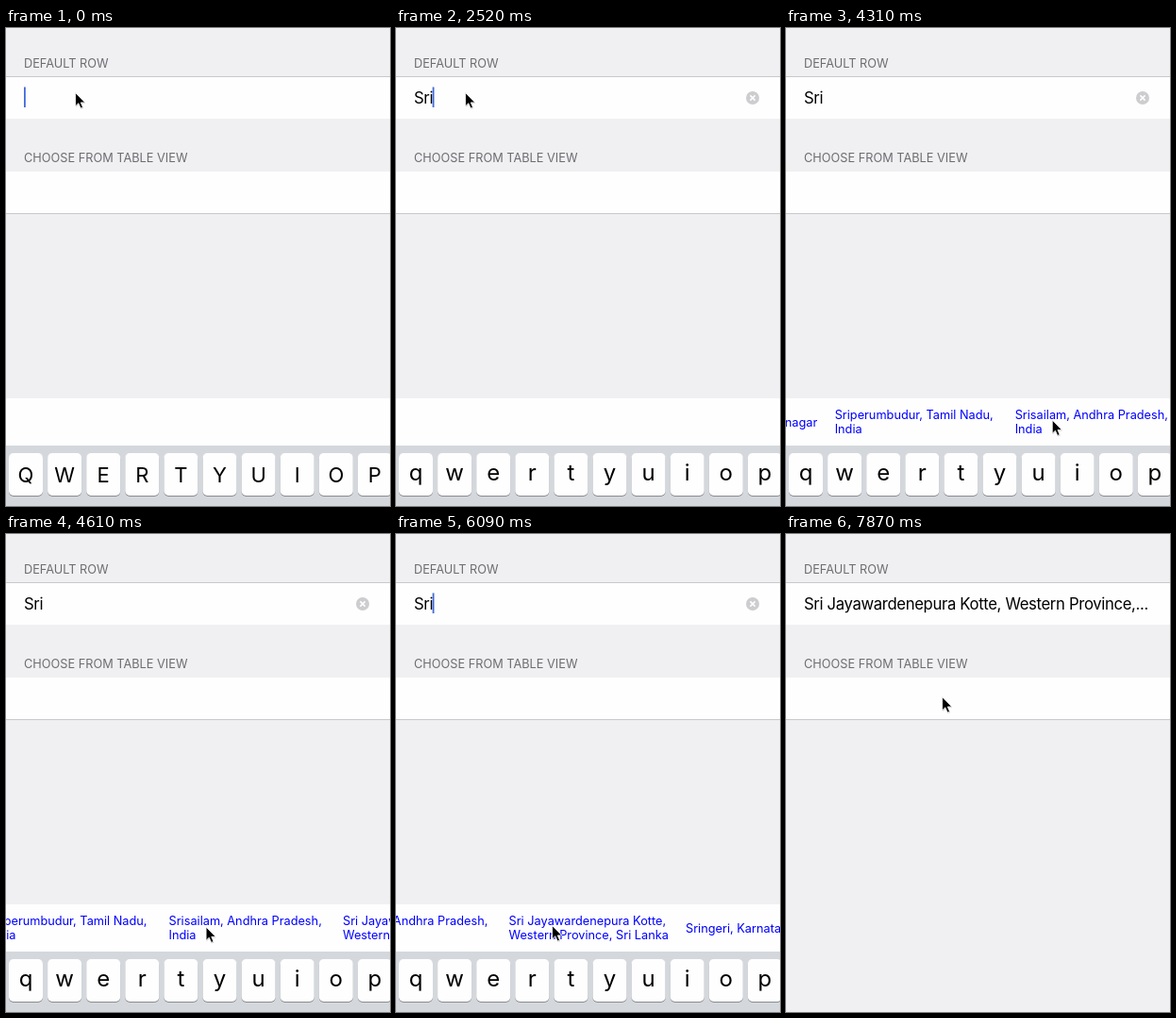
Recreate the animation shown at these times as an HTML page. Size 407x506 px, loop 8000 ms.

```html
<!DOCTYPE html>
<html lang="en">
<head>
<meta charset="utf-8">
<title>Place suggestions</title>
<style>
html, body { margin: 0; width: 100%; height: 100%; overflow: hidden; background: #f0f0f2; }
svg { display: block; width: 100vw; height: 100vh; font-family: Inter, "Open Sans", sans-serif; }
.head { font-size: 12.75px; fill: #6d6d72; }
.field { font-size: 16.7px; letter-spacing: -.345px; fill: #000; }
.place { font-size: 12.75px; fill: #00f; }
.key { text-anchor: middle; fill: #000; }
</style>
</head>
<body>
<svg id="stage" viewBox="0 0 407 506">
  <rect width="407" height="506" fill="#f0f0f2"/>
  <rect y="51" width="407" height="1" fill="#c8c7cc"/>
  <rect y="52" width="407" height="44" fill="#fefefe"/>
  <rect y="152" width="407" height="44" fill="#fefefe"/>
  <rect y="196" width="407" height="1" fill="#c8c7cc"/>
  <text class="head" x="19" y="41.5">DEFAULT ROW</text>
  <text class="head" x="19" y="142">CHOOSE FROM TABLE VIEW</text>
  <text class="field" id="field" x="19" y="80"></text>
  <rect id="caret" y="62.5" width="1.8" height="21.5" fill="#426bd9"/>
  <g id="clear">
    <circle cx="378" cy="74" r="7" fill="#cdcdd0"/>
    <path d="M375.4 71.4l5.2 5.2m0-5.2l-5.2 5.2" stroke="#fff" stroke-width="1.5"/>
  </g>
  <g id="panel">
    <rect y="392" width="407" height="50" fill="#fefefe"/>
    <g id="places"></g>
    <rect y="442" width="407" height="64" fill="#d4d8dd"/>
    <g id="keys"></g>
  </g>
  <g id="mouse">
    <g transform="translate(.6 .6) scale(.92)">
      <path d="M.5 2v14.6l3.4-3.2 2.4 5.6 3-1.2-2.4-5.5h4.8z" fill="#000" opacity=".18"/>
      <path d="M0 0v15.4l3.5-3.3 2.5 5.7 2.6-1.1-2.4-5.5h4.9z" fill="#000" stroke="#fff" stroke-width=".9"/>
    </g>
  </g>
</svg>
<script>
const LOOP = 8000, TICK = 148.5;
const TYPE = 13, SUGGEST = 21, PICK = 44; // moments, in ticks
const SLOP = 9; // distance before a drag starts to scroll
const $ = id => document.getElementById(id);

function add(parent, tag, attrs, text = '') {
  const el = document.createElementNS('http://www.w3.org/2000/svg', tag);
  for (const name in attrs) el.setAttribute(name, attrs[name]);
  el.textContent = text;
  parent.append(el);
  return el;
}

const places = [
  [8, 'Srinagar'],
  [77, 'Sriperumbudur, Tamil Nadu,', 'India'],
  [268, 'Srisailam, Andhra Pradesh,', 'India'],
  [452.5, 'Sri Jayawardenepura Kotte,', 'Western Province, Sri Lanka'],
  [640, 'Sringeri, Karnataka, India']
];
for (const [x, ...lines] of places) {
  const top = lines.length > 1 ? 414 : 422;
  lines.forEach((line, i) => add($('places'), 'text', { class: 'place', x, y: top + i * 15.3 }, line));
}

const keys = [...'qwertyuiop'].map((letter, i) => {
  const mid = 21 + i * 41.1;
  const cap = { x: mid - 18, width: 36, height: 45, rx: 5 };
  add($('keys'), 'rect', { ...cap, y: 451, fill: '#898b8f' });
  add($('keys'), 'rect', { ...cap, y: 450, fill: '#fefefe' });
  return { letter, el: add($('keys'), 'text', { class: 'key', x: mid }) };
});

const home = { x: 73, y: 68 };
const gestures = [
  { from: 23, to: 27, x: 316, y: 413 },
  { from: 27, to: 33.9, x: 147, y: 416, drag: true },
  { from: 34, to: 37, x: 347, y: 405 },
  { from: 37, to: 41, x: 165, y: 414, drag: true },
  { from: 41, to: 44, x: 194, y: 412 },
  { from: 47, to: 53, x: 165, y: 172 }
];

const progress = (n, from, to) => Math.min(1, Math.max(0, (n - from) / (to - from)));
const smooth = u => u * u * (3 - 2 * u);
const easeOut = u => u * (2 - u);

// Vertical motion runs ahead of horizontal; drags also pull the list
function pointer(n) {
  let { x, y } = home, scroll = 0;
  for (const g of gestures) {
    const u = progress(n, g.from, g.to);
    const dx = (g.x - x) * smooth(u);
    if (g.drag) scroll += Math.max(0, -dx - SLOP);
    x += dx;
    y += (g.y - y) * easeOut(u);
    if (u < 1) break;
  }
  return { x, y, scroll };
}

function typed(n) {
  if (n >= PICK) return 'Sri Jayawardenepura Kotte, Western Province,...';
  return 'Sri'.slice(0, Math.max(0, Math.floor((n - TYPE) / 2) + 1));
}

// The blink restarts after the last letter
function caretAlpha(n) {
  if (n >= PICK) return 0;
  const rest = TYPE + 5;
  if (n >= TYPE && n < rest) return 1;
  const beat = (n < TYPE ? n : n - rest) % 7;
  return beat < 3 ? 1 : beat === 3 ? .5 : 0;
}

const move = (id, x, y) => $(id).setAttribute('transform', `translate(${x} ${y})`);
const fade = (id, alpha) => $(id).setAttribute('opacity', Number(alpha));

function draw(time) {
  const n = Math.floor((time + 4) / TICK);
  const text = typed(n), lower = n > TYPE;
  $('field').textContent = text;
  $('caret').setAttribute('x', 19 + (text ? $('field').getComputedTextLength() - .5 : 0));
  fade('caret', caretAlpha(n));
  fade('clear', n >= TYPE && n < PICK);
  fade('places', n >= SUGGEST);
  for (const { letter, el } of keys) {
    el.textContent = lower ? letter : letter.toUpperCase();
    el.setAttribute('y', lower ? 479 : 480.5);
    el.setAttribute('font-size', lower ? 24 : 22);
  }
  const { x, y, scroll } = pointer(n);
  move('mouse', x, y);
  move('places', -scroll, 0);
  move('panel', 0, 116 * smooth(progress(n, PICK - 1, PICK + 2)));
}

const start = performance.now();
function loop() {
  draw((performance.now() - start) % LOOP);
  requestAnimationFrame(loop);
}
loop();
</script>
</body>
</html>
```
